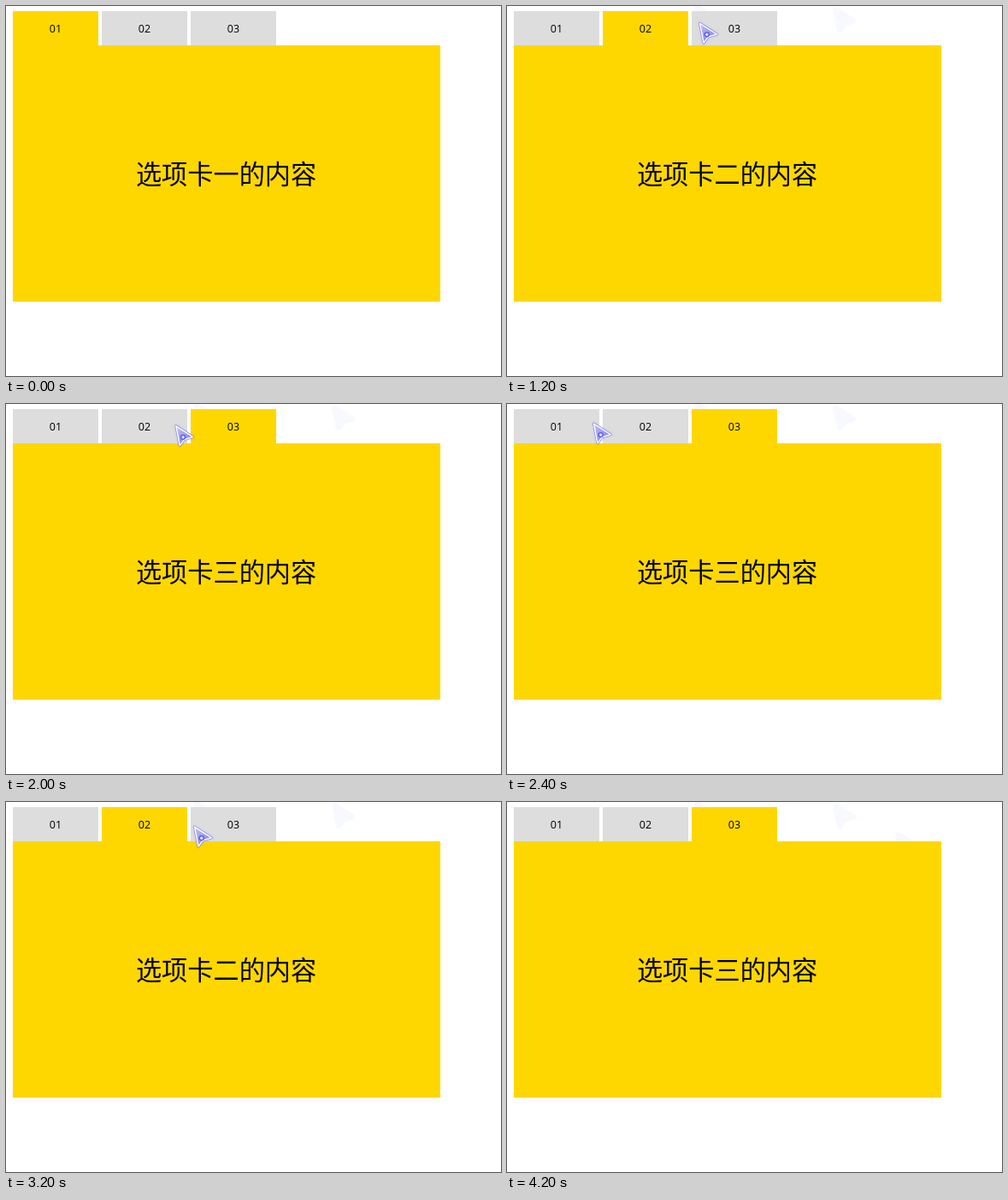
An HTML page that plays this animation: 579 px wide and 433 px high, repeating every 4.6 s.

```html
<!DOCTYPE html>
<html lang="zh-CN">
<head>
<meta charset="utf-8">
<title>选项卡</title>
<style>
  html, body { margin: 0; width: 100%; height: 100%; overflow: hidden; background: #fff; }
  svg { display: block; }
  .tab { fill: #ddd; }
  .tab.on, .panel { fill: gold; }
  text { text-anchor: middle; fill: #000; }
  .label { font: 500 12.5px "Open Sans", "Noto Sans", sans-serif; }
  .content { font: 30.2px "Noto Sans CJK SC", "Noto Sans CJK", "Noto Sans CJK JP", sans-serif; }
  .glow { fill: #5a5aff; stroke: #5a5aff; stroke-width: 7; stroke-linejoin: round; opacity: .035; }
  #cursor { --edge: #7a7aec; --core: #5656e8; --fill: url(#cool); }
  #cursor.warm { --edge: #77686c; --core: #5f5888; --fill: url(#dusk); }
  .edge { fill: none; stroke: var(--edge); stroke-width: 3; stroke-linejoin: round; opacity: .8; }
  .body { fill: var(--fill); stroke: #fff; stroke-width: 1.4; stroke-linejoin: round; }
  .core { fill: #d9d9ff; stroke: var(--core); stroke-width: 1.3; }
</style>
</head>
<body>
<svg width="579" height="433" viewBox="0 0 579 433">
  <defs>
    <path id="arrow" d="M1.8 1.8L21.5 14.5L11.5 17.6L6.2 24.6Z"/>
    <linearGradient id="cool" x2=".6" y2="1">
      <stop stop-color="#c4c4e6"/><stop offset="1" stop-color="#8282f4"/>
    </linearGradient>
    <linearGradient id="dusk" x2=".6" y2="1">
      <stop stop-color="#857a76"/><stop offset="1" stop-color="#b4a9b2"/>
    </linearGradient>
  </defs>
  <g id="trails"></g>
  <g id="tabs"></g>
  <rect class="panel" x="8" y="46" width="500" height="300"/>
  <text class="content" id="content" x="257.6" y="208"></text>
  <g id="cursor">
    <use href="#arrow" class="glow"/>
    <use href="#arrow" class="edge"/>
    <use href="#arrow" class="body"/>
    <circle class="core" cx="10" cy="14.8" r="2.5"/>
  </g>
</svg>
<script>
// Everything moves in hard steps of one beat.
const BEAT = 200, BEATS = 23;
const $ = id => document.getElementById(id);
const cursor = $('cursor'), content = $('content');

// Where the cursor arrives, and how many beats it rests there
const stops = [
  { beat: 2, x: 383, y: 3 },
  { beat: 3, x: 221, y: 0 },
  { beat: 4, x: 172, y: 13, rest: 1 },
  { beat: 8, x: 276, y: 24, rest: 1 },
  { beat: 11, x: 162, y: 24 },
  { beat: 13, x: 72, y: 20 },
  { beat: 15, x: 162, y: 26 },
  { beat: 17, x: 244, y: 28, rest: 1 },
  { beat: 20, x: 550, y: 40 }
];
const first = stops[0].beat, last = stops.at(-1).beat;

// Each click selects the next tab; a slow one is seen held down the beat before.
const clicks = [
  { beat: 6, slow: true }, { beat: 10, slow: true }, { beat: 13 },
  { beat: 16, slow: true }, { beat: 18 }
];
// Beats at which the cursor leaves a faint mark behind
const markBeats = [2, 3, 19];

const easeOut = u => 1 - (1 - u) ** 1.7;
const selected = beat => clicks.filter(c => c.beat <= beat).length % 3;
const tabX = i => 8 + i * 104;

function cursorAt(beat) {
  const next = stops.findIndex(s => s.beat >= beat);
  const to = stops[next], from = stops[next - 1] || to;
  const leave = from.beat + (from.rest || 0);
  const u = to === from ? 1 : easeOut(Math.max(0, (beat - leave) / (to.beat - leave)));
  return { x: from.x + (to.x - from.x) * u, y: from.y + (to.y - from.y) * u };
}

function overGold({ x, y }, active) {
  const cx = x + 10, cy = y + 14;
  const [left, width] = cy > 46 ? [8, 500] : [tabX(active), 100];
  return cx > left && cx < left + width;
}

function add(parent, tag, attrs) {
  const node = document.createElementNS('http://www.w3.org/2000/svg', tag);
  for (const key in attrs) node.setAttribute(key, attrs[key]);
  return parent.appendChild(node);
}

const place = ({ x, y }) => `translate(${x} ${y})`;
const show = (node, on) => { node.style.display = on ? '' : 'none'; };

const tabs = [0, 1, 2].map(i => {
  const box = add($('tabs'), 'rect', { x: tabX(i), y: 6, width: 100, height: 40 });
  const label = add($('tabs'), 'text', { class: 'label', y: 31 });
  label.textContent = '0' + (i + 1);
  return { box, label };
});

const trails = markBeats.map(beat =>
  add($('trails'), 'use', { href: '#arrow', class: 'glow', transform: place(cursorAt(beat)) }));

function draw(beat) {
  const active = selected(beat);
  const held = clicks.some(c => c.slow && c.beat === beat + 1) ? selected(beat + 1) : -1;
  tabs.forEach(({ box, label }, i) => {
    box.setAttribute('class', i === active ? 'tab on' : 'tab');
    label.setAttribute('x', tabX(i) + 50 + (i === held ? 1 : 0));
  });
  content.textContent = `选项卡${'一二三'[active]}的内容`;
  trails.forEach((trail, i) => show(trail, beat > markBeats[i]));

  const visible = beat >= first && beat <= last;
  show(cursor, visible);
  if (!visible) return;
  const spot = cursorAt(beat);
  cursor.setAttribute('transform', place(spot));
  cursor.setAttribute('class', overGold(spot, active) ? 'warm' : '');
}

const start = performance.now();
let shown = -1;
function tick() {
  const beat = Math.floor((performance.now() - start) / BEAT) % BEATS;
  if (beat !== shown) draw(shown = beat);
  requestAnimationFrame(tick);
}
tick();
</script>
</body>
</html>
```
